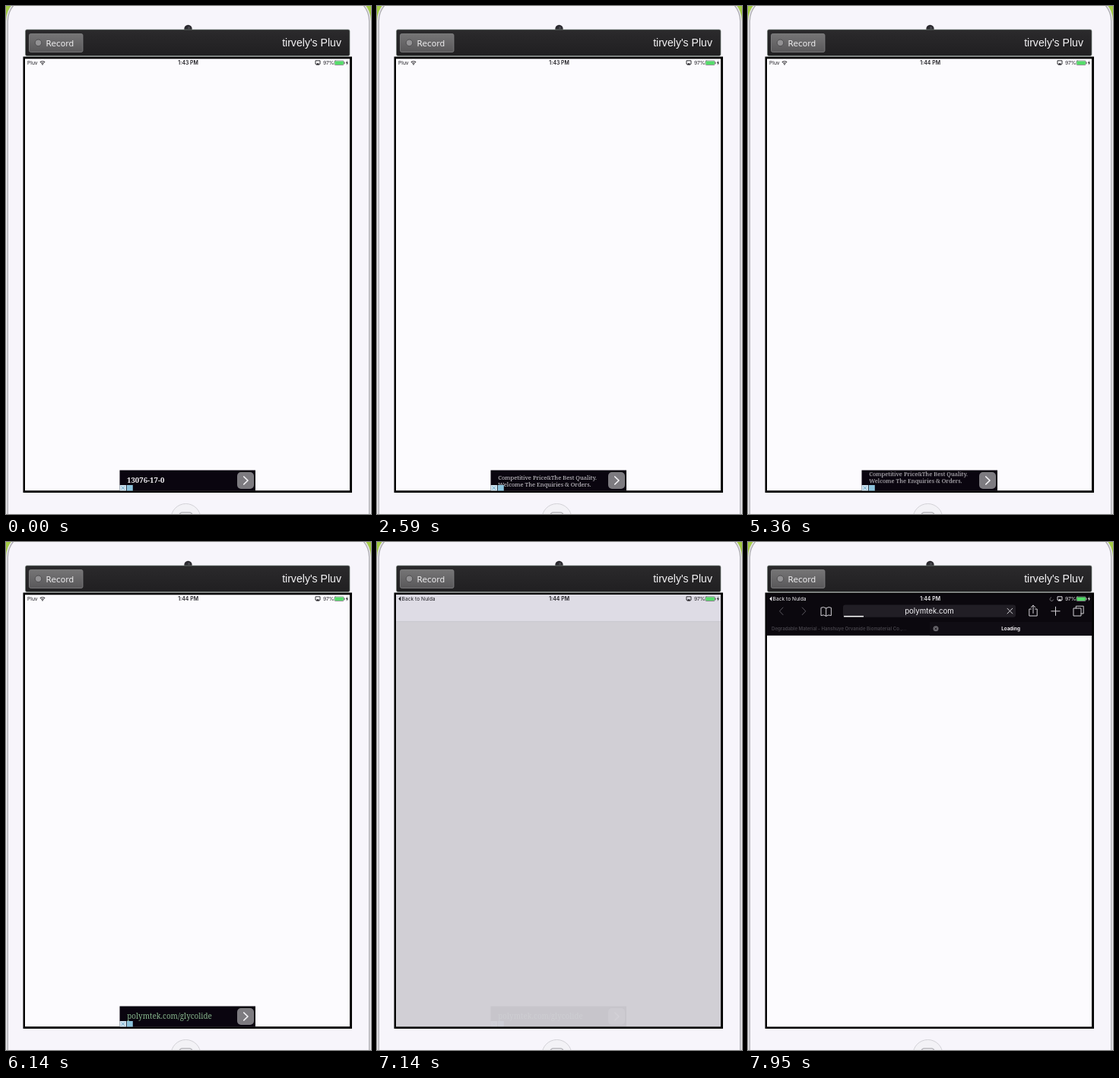
Write an HTML page that moves like this. It is 480 px wide and 667 px high and loops after 8 s.

```html
<!DOCTYPE html>
<html lang="en">
<head>
<meta charset="utf-8">
<title>Tablet ad tap</title>
<style>
  html, body { margin: 0; width: 100%; height: 100%; overflow: hidden; background: #f7f5fb; }
  svg { display: block; width: 480px; height: 667px; }
  text { font-family: Inter, "Liberation Sans", sans-serif; }
  .serif { font-family: "Noto Serif", "Liberation Serif", serif; }
  .line { fill: none; stroke: currentColor; stroke-linecap: round; stroke-linejoin: round; }
  .small { font-size: 6.7px; fill: currentColor; }
  .dark { color: #1c1b20; }
  .light { color: #f4f3f6; }
  #spin { transform-origin: 399.5px 75px; }
</style>
</head>
<body>
<svg viewBox="0 0 480 667">
  <defs>
    <linearGradient id="barFill" x2="0" y2="1">
      <stop stop-color="#2b2a2c"/><stop offset="1" stop-color="#201f21"/>
    </linearGradient>
    <linearGradient id="btnFill" x2="0" y2="1">
      <stop stop-color="#767576"/><stop offset="1" stop-color="#59585a"/>
    </linearGradient>
    <clipPath id="adClip"><rect x="149.5" y="609.5" width="178.5" height="27"/></clipPath>
    <g id="back">
      <path d="M28.3 74.6 31.3 71.4V77.8Z" fill="currentColor"/>
      <text class="small" x="32.6" y="77">Back to Nulda</text>
    </g>
    <g id="gauges">
      <path class="line" d="M408.4 76.2H407V71.8H413V76.2H411.6" stroke-width=".9"/>
      <path d="M410 74.4 412.4 77.6H407.6Z" fill="currentColor"/>
      <text class="small" x="417" y="77">97%</text>
      <rect class="line" x="431.9" y="72" width="12.4" height="5.4" rx="1.2" stroke-width=".5"/>
      <rect x="432.4" y="72.5" width="11.4" height="4.4" rx=".8" fill="#55dc6a"/>
      <path d="M445 73.8V75.7" stroke="currentColor" stroke-width=".8"/>
      <path d="M449 71.6 446.9 75H448.2L447.7 77.8 450 74.2H448.6Z" fill="currentColor"/>
    </g>
  </defs>

  <!-- tablet body -->
  <rect width="480" height="667" fill="#a3cb45"/>
  <rect x="0" y="-14" width="480" height="740" rx="34" fill="#e6e5e9"/>
  <rect x="2.3" y="-12" width="475.4" height="740" rx="32" fill="#f7f5fb" stroke="#aeadb2" stroke-width="1.3"/>
  <circle cx="239.5" cy="30" r="5.2" fill="#2c2b30"/>
  <circle cx="240.5" cy="28.5" r="1.6" fill="#4a4950"/>
  <circle cx="236.5" cy="673" r="19.5" fill="#f3f2f6" stroke="#d3d2d7"/>
  <rect x="228" y="665" width="17" height="17" rx="4" fill="none" stroke="#b9b8bd" stroke-width="1.6"/>

  <!-- recorder bar -->
  <rect x="25.5" y="31" width="426.5" height="34.5" rx="2" fill="url(#barFill)" stroke="#77857c" stroke-width=".7"/>
  <rect x="30.5" y="36.5" width="70.5" height="24" rx="2" fill="url(#btnFill)" stroke="#858486" stroke-width=".8"/>
  <circle cx="42.5" cy="48.3" r="4.3" fill="#929193" stroke="#4e4d4f"/>
  <text x="52.5" y="52.6" font-size="10.6" fill="#efeef0" style="font-family:'DejaVu Sans',sans-serif">Record</text>
  <text x="441" y="53" font-size="14.1" fill="#f5f4f6" text-anchor="end" style="font-family:'Liberation Sans',sans-serif">tirvely's Pluv</text>

  <!-- screen -->
  <rect x="22.5" y="66.5" width="432.5" height="572.5" fill="#000"/>
  <rect x="25" y="69.3" width="427" height="566.9" fill="#fcfbfe"/>
  <rect id="dim" x="25" y="69.3" width="427" height="566.9" fill="#d1cfd5"/>
  <g id="nav">
    <rect x="25" y="69.3" width="427" height="34.7" fill="#dedce5"/>
    <path d="M25 104.3H452" stroke="#c3c1c8" stroke-width=".6"/>
  </g>

  <g id="ad" clip-path="url(#adClip)">
    <rect x="149.5" y="609.5" width="178.5" height="27" fill="#0a050f"/>
    <text id="code" class="serif" x="159" y="626.3" font-size="9.7" font-weight="700" fill="#f3f1f4">13076-17-0</text>
    <g id="pitch" fill="#d6d4d8" font-size="7.6">
      <text class="serif" x="159.3" y="621.6">Competitive Price&amp;The Best Quality.</text>
      <text class="serif" x="159.3" y="630.6">Welcome The Enquiries &amp; Orders.</text>
    </g>
    <text id="link" class="serif" x="159.3" y="626.2" font-size="9.9" fill="#86b58b">polymtek.com/glycolide</text>
    <rect x="304" y="612" width="22" height="22" rx="5" fill="#7d7b80"/>
    <path class="line light" d="M312.8 618 318 623 312.8 628" stroke-width="1.7"/>
    <rect x="149.5" y="629" width="8.6" height="7.5" fill="#cfe3ef"/>
    <path d="M151.7 630.6 155.9 634.8M155.9 630.6 151.7 634.8" stroke="#5d9fc4" stroke-width=".9"/>
    <rect x="158.8" y="629" width="8" height="7.5" fill="#8cc3dc"/>
  </g>

  <!-- light status bar -->
  <g id="status" class="dark">
    <g id="device">
      <text class="small" x="28" y="77">Pluv</text>
      <g class="line" stroke-width="1.1" style="stroke-linecap:butt">
        <path d="M44.9 74A4.4 4.4 0 0 1 51.1 74"/>
        <path d="M46.3 75.4A2.4 2.4 0 0 1 49.7 75.4"/>
      </g>
      <circle cx="48" cy="76.8" r=".8" fill="currentColor"/>
    </g>
    <use id="backDark" href="#back"/>
    <g font-size="6.9" font-weight="600" fill="currentColor" text-anchor="middle">
      <text id="before" x="239.6" y="77">1:43 PM</text>
      <text id="after" x="239.6" y="77">1:44 PM</text>
    </g>
    <use href="#gauges"/>
  </g>

  <!-- browser -->
  <g id="browser" class="light">
    <rect x="25" y="69.3" width="427" height="566.9" fill="#fcfbfe"/>
    <rect x="24" y="68" width="428.5" height="54.8" fill="#0b080e"/>
    <rect x="239" y="105" width="213" height="17.8" fill="#100d14"/>
    <use href="#back"/>
    <use href="#gauges"/>
    <text x="239.6" y="77" font-size="6.9" font-weight="600" fill="currentColor" text-anchor="middle">1:44 PM</text>
    <path id="spin" class="line" d="M398.6 72.8A2.4 2.4 0 1 0 401.7 75.8" stroke="#77757b" style="stroke:#77757b"/>
    <g class="line" style="color:#5b5960">
      <path d="M46 86 41.5 90.8 46 95.6M71.3 86 75.8 90.8 71.3 95.6"/>
    </g>
    <rect x="125" y="82.5" width="227" height="16.2" rx="3" fill="#211e25"/>
    <text x="238.5" y="94" font-size="9.7" fill="currentColor" text-anchor="middle">polymtek.com</text>
    <rect id="load" x="126" y="96.9" width="26" height="1.5" fill="#fff" style="transform-origin:126px 97px"/>
    <g class="line" style="color:#d3d1d6">
      <path d="M341 87.2 347.8 94M347.8 87.2 341 94"/>
      <path d="M102.7 87V97.3Q99.5 94.8 96 96.6V86.3Q99.5 84.5 102.7 87Q106 84.5 109.4 86.3V96.6Q106 94.8 102.7 97.3"/>
      <path d="M372.4 88H369.8V97H380.2V88H377.6M375 93.5V83.2M372.3 85.8 375 83.1 377.7 85.8"/>
      <path d="M404.5 85.2V96.4M398.9 90.8H410.1"/>
      <path d="M428.4 87H438V97H428.4ZM431.3 87V84.2H441.2V94H438"/>
    </g>
    <text x="31" y="116" font-size="6.1" font-weight="600" fill="#454249">Degradable Material - Hanshuye Orvanide Biomaterial Co.,...</text>
    <circle cx="247" cy="113.8" r="3.5" fill="#6a686e"/>
    <path d="M245.6 112.4 248.4 115.2M248.4 112.4 245.6 115.2" stroke="#100d14" stroke-width=".9"/>
    <text x="345.6" y="116" font-size="6.3" font-weight="700" fill="#f1eff3" text-anchor="middle">Loading</text>
  </g>
</svg>
<script>
const LOOP = 8000;

// Each step is [ms, value, easing to the next step].
function play(id, prop, steps) {
  const frames = steps.map(([ms, value, easing = 'linear']) =>
    ({ offset: ms / LOOP, [prop]: value, easing }));
  if (steps[0][0] > 0) frames.unshift({ ...frames[0], offset: 0, easing: 'linear' });
  const last = frames[frames.length - 1];
  if (last.offset < 1) frames.push({ ...last, offset: 1 });
  const anim = document.getElementById(id).animate(frames, { duration: LOOP, iterations: Infinity });
  anim.startTime = start;
}

const start = performance.now();
const fade = (id, ...steps) => play(id, 'opacity', steps);
const swap = (id, ms, from, to) => fade(id, [0, from], [ms, from], [ms, to]);
const slide = (id, ...steps) =>
  play(id, 'transform', steps.map(([ms, y, ease]) => [ms, `translateY(${y}px)`, ease]));

// Ad lines roll upward every four seconds.
slide('code', [1230, 0, 'ease'], [2130, -27]);
slide('pitch', [1230, 27, 'ease'], [2130, 0], [5230, 0, 'ease'], [6130, -27]);
slide('link', [5230, 27, 'ease'], [6130, 0]);

swap('before', 4050, 1, 0);
swap('after', 4050, 0, 1);

// Tap: the app dims away and the browser takes over.
fade('dim', [6850, 0], [6980, 1]);
fade('ad', [6940, 1], [7000, .75], [7140, .05], [7190, 0]);
fade('nav', [6970, 0], [7000, .15], [7140, 1]);
fade('device', [6950, 1], [7000, .8], [7120, 0]);
fade('backDark', [6950, 0], [7000, .22], [7140, 1]);
fade('browser', [7340, 0], [7540, 1]);
play('load', 'transform', [[7500, 'scaleX(0)', 'ease-out'], [7900, 'scaleX(1)']]);
play('spin', 'transform', [[7540, 'rotate(-160deg)'], [7950, 'rotate(0deg)']]);
</script>
</body>
</html>
```
